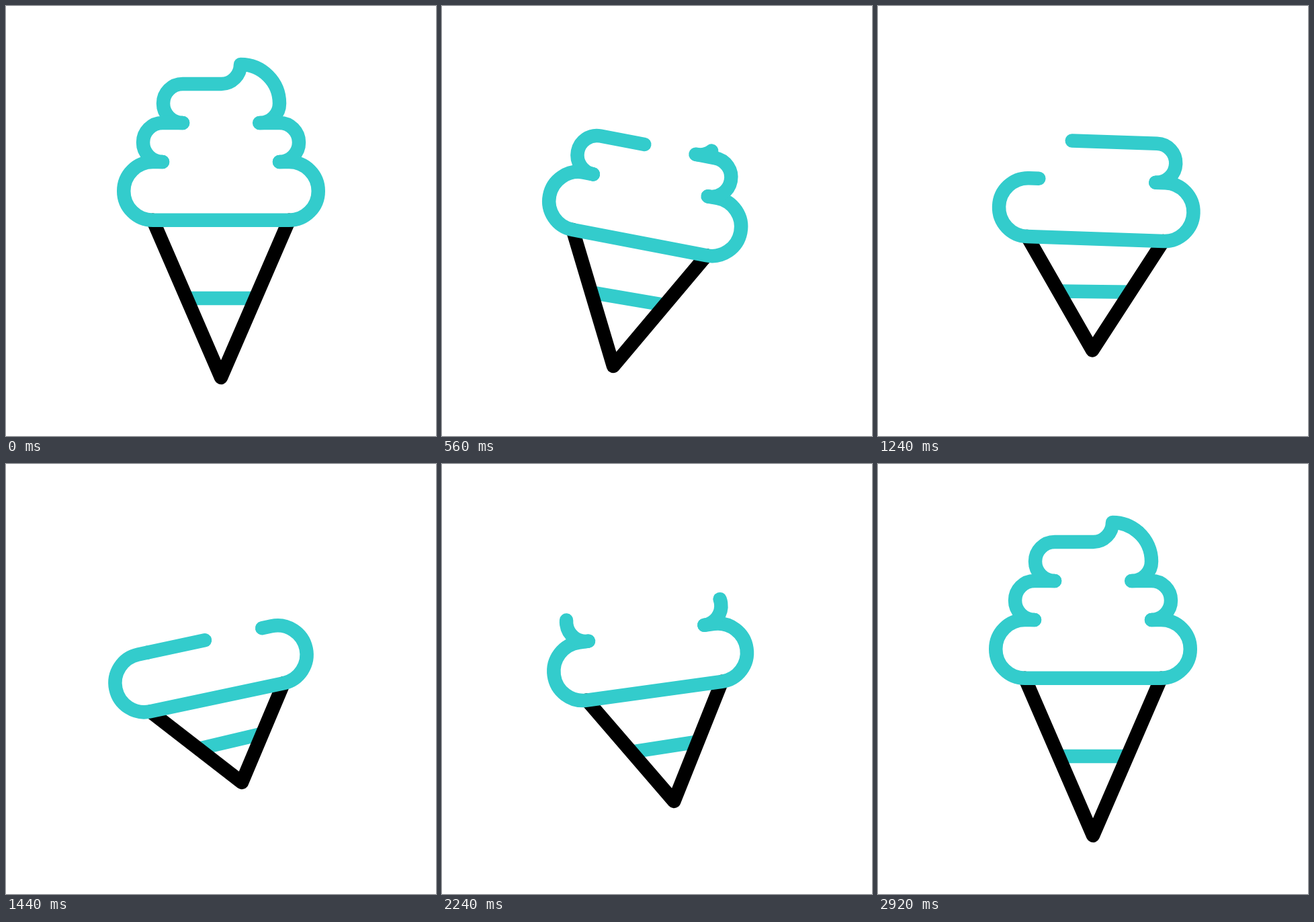
Write an HTML page with a canvas that moves like this. It is 640x640 px and loops after 3000 ms.

```html
<!DOCTYPE html>
<html lang="en">
<head>
<meta charset="utf-8">
<title>Ice cream</title>
<style>
  html, body { margin: 0; width: 100%; height: 100%; overflow: hidden; background: #fff; }
  canvas { display: block; width: 100vmin; height: 100vmin; }
</style>
</head>
<body>
<canvas id="stage" width="640" height="640"></canvas>
<script>
const ctx = document.getElementById('stage').getContext('2d');
const LOOP = 3000, STEP = 40;
const TEAL = '#33cccc', BLACK = '#000';

// Outline pieces, drawn upright; the scoop centre is the pivot.
const CENTRE = [320, 275.4];
const HALF = 101.4, BASE_Y = 43.4;
const scoop = new Path2D('M233 232H218.6A43.4 43.4 0 0 0 218.6 318.8H421.4A43.4 43.4 0 0 0 421.4 232H407');
const middle = new Path2D('M233 232A29 29 0 0 1 233 174H407A29 29 0 0 1 407 232');
const swirl = new Path2D('M263 174A29 29 0 0 1 263 116H320.5A29 29 0 0 0 349 87A58 58 0 0 1 407 145A29 29 0 0 1 378 174');
const lid = new Path2D('M233 232H407');
const ARC = Math.PI * 29;
const MIDDLE = 2 * ARC + 174, SWIRL = 2 * ARC + 57.5 + Math.PI * 29, LID = 174;
const LEDGE = ARC + 30, SWIRL_LEFT = 235.5;

// Poses: centre x, y, angle, cone tip x, y, stripe y, stripe tilt
const whole  = [320, 275.4, 0, 0, 277.6, 159.6, 0];
const bitten = [302.2, 309.5, 10.9, -3.5, 231.3, 128.7, -2.4];
const eaten  = [305, 304.8, -12, 9.8, 175, 111.5, -2.2];

// Each spark: inner x, y, outer x, y
const sparksOne = [[248, 138, 221, 103.6], [335, 133, 341.5, 94], [419, 160, 453.5, 133]];
const sparksTwo = [[190, 217.5, 155.5, 193.8], [272, 186, 265.3, 147], [360, 185, 384, 150.5]];

const linear = (t, from, to) => Math.min(1, Math.max(0, (t - from) / (to - from)));
const ease = (t, from, to) => {
  const u = linear(t, from, to);
  return u * u * (3 - 2 * u);
};
const mix = (a, b, p) => a + (b - a) * p;
const blend = (a, b, p) => a.map((v, i) => mix(v, b[i], p));

function poseAt(t) {
  if (t < 1104) return blend(whole, bitten, ease(t, 80, 560));
  if (t >= 2114) return blend(eaten, whole, ease(t, 2114, 2434));
  const p = ease(t, 1104, 1424), bow = 4 * p * (1 - p);
  const pose = blend(bitten, eaten, p);
  pose[0] += 22.6 * bow;
  pose[1] -= 4.8 * bow;
  return pose;
}

function line(color, ...points) {
  ctx.strokeStyle = color;
  ctx.beginPath();
  points.forEach(([x, y]) => ctx.lineTo(x, y));
  ctx.stroke();
}

// Strokes only the stretch of a path between two distances.
function stretch(path, from, to) {
  if (to - from < 0.01) return;
  ctx.setLineDash([to - from, 9999]);
  ctx.lineDashOffset = -from;
  ctx.stroke(path);
  ctx.setLineDash([]);
}

function drawCone([, , , tipX, tipY, stripeY, tilt]) {
  const end = (side, y) => [mix(side * HALF, tipX, (y - BASE_Y) / (tipY - BASE_Y)), y];
  ctx.lineCap = 'butt';
  line(TEAL, end(-1, stripeY - tilt / 2), end(1, stripeY + tilt / 2));
  ctx.lineCap = 'round';
  line(BLACK, [-HALF, BASE_Y], [tipX, tipY], [HALF, BASE_Y]);
}

function drawCream(t) {
  ctx.strokeStyle = TEAL;
  ctx.stroke(scoop);

  if (t < 2000) {
    stretch(lid, 0, LID * ease(t, 1280, 1600));
  } 
  if (t < 1104) {
    stretch(swirl, SWIRL * ease(t, 294, 614), SWIRL);
    stretch(middle, 0, LEDGE + 115 * ease(t, 440, 760));
    stretch(middle, MIDDLE - LEDGE, MIDDLE);
  } else if (t < 2000) {
    stretch(middle, MIDDLE * ease(t, 1104, 1424), MIDDLE);
  } else {
    const side = LID / 2 * (1 - ease(t, 2000, 2200));
    stretch(lid, 0, side);
    stretch(lid, LID - side, LID);
    const ledge = LEDGE * linear(t, 2060, 2480);
    stretch(middle, 0, ledge);
    stretch(middle, MIDDLE - ledge, MIDDLE);
    const rise = linear(t, 2480, 2920);
    stretch(swirl, 0, SWIRL_LEFT * rise);
    stretch(swirl, SWIRL - (SWIRL - SWIRL_LEFT) * rise, SWIRL);
  }
}

function drawSparks(sparks, t, start) {
  const head = ease(t, start, start + 320), tail = ease(t, start + 280, start + 590);
  if (head - tail < 0.001) return;
  for (const [x1, y1, x2, y2] of sparks) {
    const at = p => [mix(x1, x2, p), mix(y1, y2, p)];
    line(BLACK, at(tail), at(head));
  }
}

function draw(t) {
  const pose = poseAt(t);
  ctx.fillStyle = '#fff';
  ctx.fillRect(0, 0, 640, 640);
  ctx.lineWidth = 20.5;
  ctx.lineCap = ctx.lineJoin = 'round';

  ctx.save();
  ctx.translate(pose[0], pose[1]);
  ctx.rotate(pose[2] * Math.PI / 180);
  drawCone(pose);
  ctx.translate(-CENTRE[0], -CENTRE[1]);
  drawCream(t);
  ctx.restore();

  drawSparks(sparksOne, t, 640);
  drawSparks(sparksTwo, t, 1480);
}

const began = performance.now();
function tick() {
  const t = (performance.now() - began) % LOOP;
  draw(Math.floor(t / STEP) * STEP);
  requestAnimationFrame(tick);
}
tick();
</script>
</body>
</html>
```
